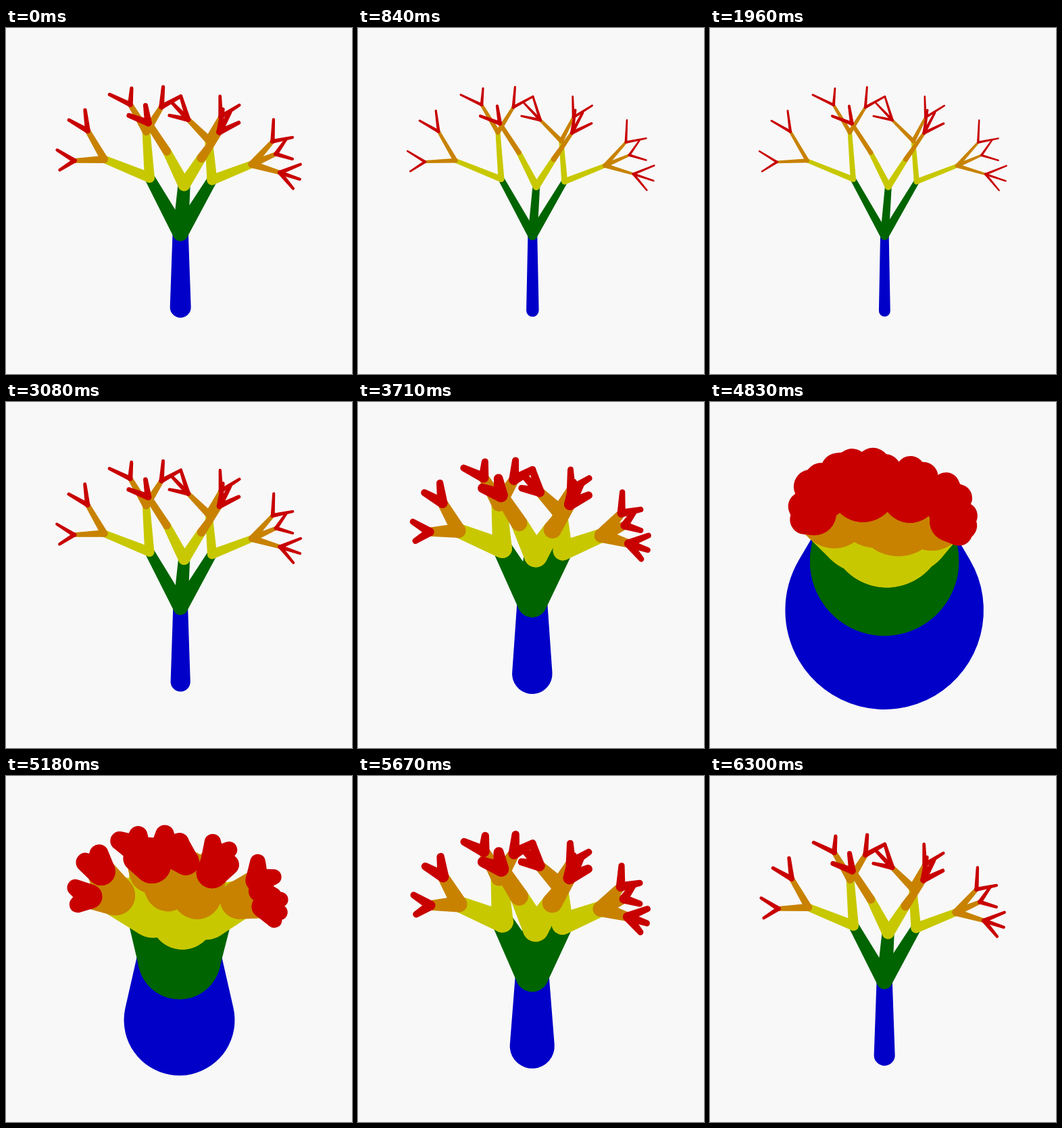
Recreate the animation shown at these times as an HTML page with a canvas. Size 512 px wide and 512 px high, loop 6370 ms.

```html
<!DOCTYPE html>
<html>
<head>
<meta charset="utf-8">
<title>Tree</title>
<style>
  html, body { margin: 0; height: 100%; overflow: hidden; background: #f8f8f8; }
  canvas { display: block; }
</style>
</head>
<body>
<canvas id="stage" width="512" height="512"></canvas>
<script>
const ctx = document.getElementById('stage').getContext('2d');
const COLORS = ['#0000c8', '#006400', '#c8c800', '#c88200', '#c80000'];
const STEP = 70, STEPS = 91;
const ROOT_X = 258.5, ROOT_Y = 418.5;
const TIP_TAPER = 0.68;

// A node is its place, its thickness relative to the root, and its children.
const node = (x, y, r, ...children) => ({ x, y, r, children });
const fork = (x, y, r, ...tips) =>
  node(x, y, r, ...tips.map(([tx, ty]) => node(tx, ty, r * TIP_TAPER)));

const tree = node(ROOT_X, ROOT_Y, 1,
  node(258.5, 307, 0.75,
    node(212, 223.5, 0.485,
      node(144, 196, 0.36,
        fork(119, 153, 0.255, [115, 122], [91, 137]),
        fork(99, 198, 0.22, [73, 182], [77, 212])),
      node(207, 154, 0.38,
        fork(183, 113.5, 0.25, [152, 98.5], [185, 89]),
        fork(230, 117, 0.25, [232.5, 87], [259, 101]))),
    node(264, 234.5, 0.585,
      node(238, 184, 0.41,
        fork(210, 141, 0.34, [206, 115], [181, 130])),
      node(290, 194, 0.45,
        fork(317, 155, 0.285, [346, 141], [322, 121], [333, 125]))),
    node(306, 227, 0.485,
      node(301, 167, 0.37,
        fork(270, 136, 0.24, [259, 101], [246, 111], [242, 130]),
        fork(319, 132, 0.22, [318, 101], [347, 114.5])),
      node(366, 203.5, 0.35,
        fork(397, 169, 0.205, [398.5, 136], [427, 163]),
        fork(402, 188, 0.2, [418, 165], [427, 195.5]),
        fork(408, 216, 0.205, [439, 203.5], [438, 226], [428, 240])))));

const levels = COLORS.map(() => []);
(function collect(parent, depth) {
  for (const child of parent.children) {
    levels[depth].push([parent, child]);
    collect(child, depth + 1);
  }
})(tree, 0);

// Outline around two circles of different size.
function limb(x1, y1, r1, x2, y2, r2) {
  const dx = x2 - x1, dy = y2 - y1, dist = Math.hypot(dx, dy);
  ctx.beginPath();
  if (dist <= Math.abs(r1 - r2)) {
    r1 > r2 ? ctx.arc(x1, y1, r1, 0, 7) : ctx.arc(x2, y2, r2, 0, 7);
  } else {
    const dir = Math.atan2(dy, dx), open = Math.acos((r1 - r2) / dist);
    ctx.arc(x1, y1, r1, dir + open, dir - open + 2 * Math.PI);
    ctx.arc(x2, y2, r2, dir - open, dir + open);
  }
  ctx.fill();
}

function draw(angle) {
  // Thickness swings with the sine; the view shrinks to keep the tree in sight.
  const thick = 1 / (0.0635 + 0.0594 * Math.sin(angle));
  const scale = 1 / (0.983 + 0.0021 * thick + 1.6e-6 * thick * thick);
  const R = thick * scale;
  const rootX = 256.5 + 0.025 * Math.abs(R - 82);
  const rootY = 425 - 0.755 * R - 0.00028 * R * R;
  const place = n => [
    rootX + scale * (n.x - ROOT_X),
    rootY + scale * (n.y - ROOT_Y),
    R * n.r
  ];

  ctx.fillStyle = '#f8f8f8';
  ctx.fillRect(0, 0, 512, 512);
  levels.forEach((limbs, i) => {
    ctx.fillStyle = COLORS[i];
    for (const [a, b] of limbs) limb(...place(a), ...place(b));
  });
}

const start = performance.now();
function tick() {
  const k = Math.floor((performance.now() - start) / STEP) % STEPS;
  draw(k / (STEPS - 1) * 2 * Math.PI);
  requestAnimationFrame(tick);
}
tick();
</script>
</body>
</html>
```
